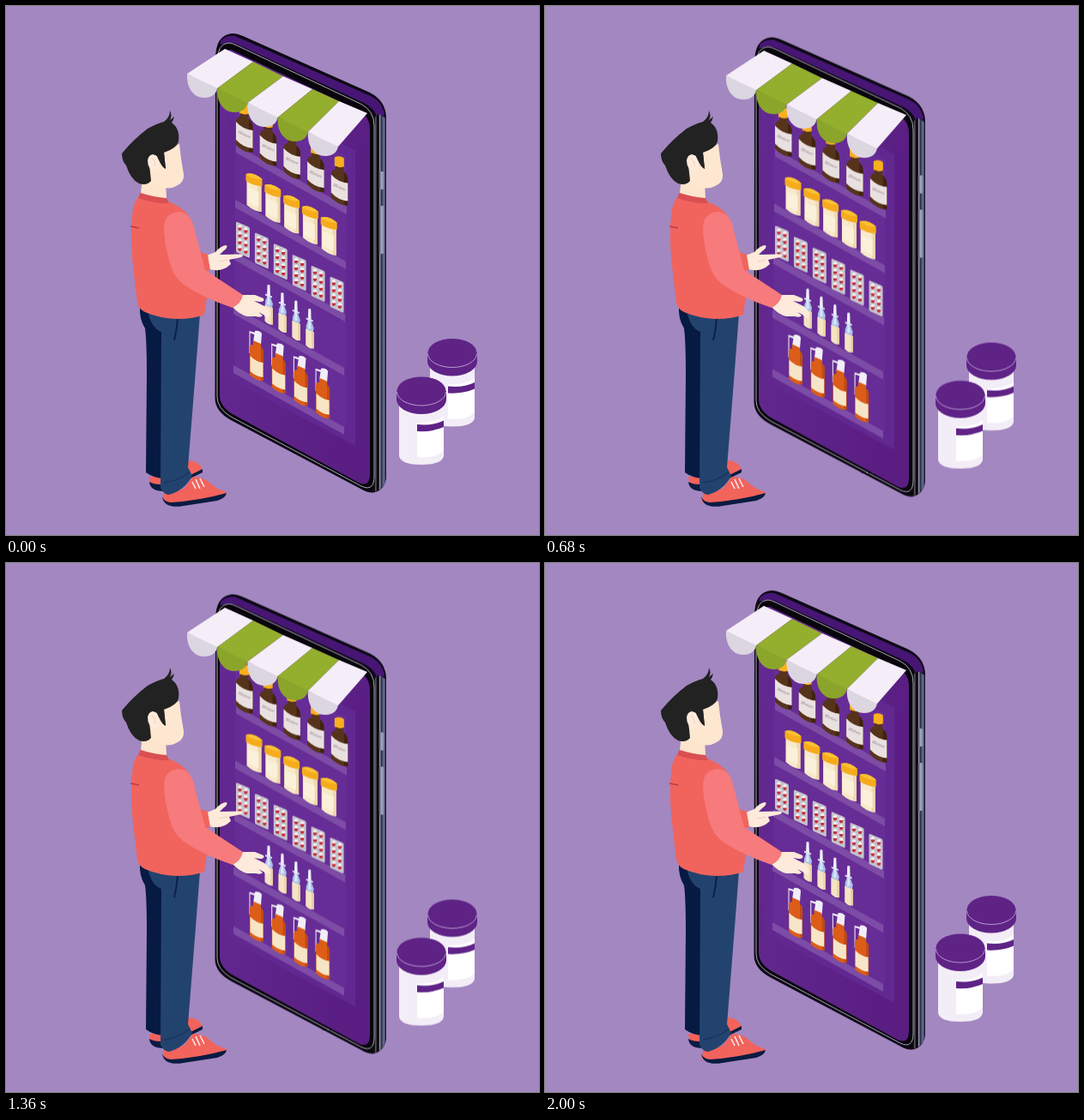
Animation, 621 px wide and 617 px high, one loop 2040 ms. Source, as an HTML page:

```html
<!DOCTYPE html>
<html lang="en">
<head>
<meta charset="utf-8">
<title>Pharmacy shelf</title>
<style>
  html, body { margin: 0; width: 100%; height: 100%; overflow: hidden; background: #a387c1; }
  svg { display: block; width: 621px; height: 617px; }
  .bob { animation: bob 2040ms cubic-bezier(.37, 0, .63, 1) infinite; }
  .phone { --drop: 6px; }
  .awning { --drop: 2.8px; }
  @keyframes bob {
    0%, 100% { transform: translateY(0); }
    50% { transform: translateY(var(--drop)); }
  }
</style>
</head>
<body>
<svg viewBox="0 0 621 617">
  <defs>
    <linearGradient id="side" gradientUnits="userSpaceOnUse" x1="426" x2="444" y1="0" y2="0">
      <stop offset="0" stop-color="#09070d"/>
      <stop offset=".2" stop-color="#141219"/>
      <stop offset=".27" stop-color="#6d6a73"/>
      <stop offset=".34" stop-color="#0b0a10"/>
      <stop offset=".46" stop-color="#08070b"/>
      <stop offset=".52" stop-color="#9c9cb3"/>
      <stop offset=".62" stop-color="#2c2e47"/>
      <stop offset=".8" stop-color="#6b7193"/>
      <stop offset=".9" stop-color="#20213b"/>
      <stop offset="1" stop-color="#171329"/>
    </linearGradient>
    <linearGradient id="screen" x1="0" x2="1" y1="0" y2=".3">
      <stop offset="0" stop-color="#642a92"/>
      <stop offset="1" stop-color="#5a1e83"/>
    </linearGradient>
    <linearGradient id="button" x1="0" x2="1">
      <stop offset="0" stop-color="#4a4d66"/>
      <stop offset=".5" stop-color="#a9adc2"/>
      <stop offset="1" stop-color="#6d7190"/>
    </linearGradient>

    <g id="syrup">
      <path d="M4 -46Q10 -49 15 -45V-35Q10 -33 4 -36Z" fill="#f9b01e"/>
      <path d="M5 -36Q10 -33 14.500 -35V-30Q19.500 -25 19.500 -20V10Q10 11 0 1V-26Q0 -31 5 -32Z" fill="#56331b"/>
      <path d="M15 -29Q19.500 -25 19.500 -20V10L15 9Z" fill="#40230f"/>
      <path d="M0 -26Q8 -17 19.500 -16V5Q8 4 0 -5Z" fill="#e9e0e0"/>
      <text transform="translate(2 -13) rotate(24)" font-family="Liberation Serif, serif" font-size="5" font-style="italic" fill="#8d7a86">Mixture</text>
    </g>

    <g id="tub">
      <path d="M1 8L18 15V45Q10 45 1 37Z" fill="#f8e9ca"/>
      <path d="M14 13L18 15V45L14 44Z" fill="#eed7ae"/>
      <path d="M2 17L15 22V40L2 34Z" fill="#fbf0da"/>
      <path d="M0 1Q9 -2 19 7V15Q9 15 0 9Z" fill="#f5ab1b"/>
      <path d="M0 1Q9 -2 19 7Q9 8 0 1Z" fill="#fbc234"/>
    </g>

    <g id="blister">
      <path d="M1.500 0L14.500 5.500Q16 6 16 8V40Q16 42 14.500 41.500L1.500 35.500Q0 35 0 33V1Q0 -.5 1.500 0Z" fill="#c4c2cc"/>
      <g id="pills"></g>
    </g>

    <g id="nasal">
      <path d="M-1.500 0Q0 -1 1.500 0L2 15H-2Z" fill="#eef0fb"/>
      <path d="M-4 10L4 13V15L-4 12Z" fill="#dfe3f5"/>
      <path d="M-2 14H2L5 22L4 27L-4 24L-4 19Z" fill="#a9c0ea"/>
      <path d="M-1 14H1L2 23H-2Z" fill="#d9e4f8"/>
      <path d="M-4.500 23L5 27V46Q0 47 -4.500 42Z" fill="#f5e3c4"/>
      <path d="M2.500 26L5 27V46L2.500 45Z" fill="#e9cfa6"/>
    </g>

    <g id="spray">
      <path d="M-8 3V27" stroke="#ded6ec" stroke-width="1.200" fill="none"/>
      <path d="M-8.500 1L5 5V8L-8.500 3Z" fill="#efeaf6"/>
      <path d="M-2 1Q3 0 6 4L5 17Q0 18 -4 14Z" fill="#f2eef8"/>
      <path d="M-4 12L5 16V20Q8 22 8 26V59Q0 60 -8 52V20Q-8 17 -4 17Z" fill="#dc5d18"/>
      <path d="M5 20Q8 22 8 26V59L5 58Z" fill="#c14b10"/>
      <path d="M-7.500 30Q-1 37 7.500 38V55Q-1 54 -7.500 48Z" fill="#f7e5c8"/>
    </g>

    <g id="jar">
      <path d="M458 462V525Q460 535 484 535Q508 535 510 525V462Z" fill="#f3edf7"/>
      <path d="M479 486Q500 487 510 478V518Q502 528 479 526Z" fill="#fff"/>
      <path d="M479 488Q497 490 510 483.500V491Q497 497 479 496Z" fill="#5f2386"/>
      <path d="M455 449V459A29 17 0 0 0 513 459V449Z" fill="#5f2386"/>
      <ellipse cx="484" cy="449" rx="28.500" ry="16.500" fill="#5f2386"/>
      <path d="M455.500 450A28.500 16 0 0 0 512.500 450" fill="none" stroke="#b79bd0" stroke-width="1"/>
    </g>
  </defs>

  <rect width="621" height="617" fill="#a387c1"/>

  <g class="bob phone">
    <use href="#jar" x="36" y="-44.500"/>
    <use href="#jar"/>

    <path d="M244 62Q244 34 263 32Q268 31.500 276 35L424 101Q443 111 443 131V548Q442 565 428 567.500Q421 568 414 563.500L262 483Q244 473 243.500 458Z" fill="#0d0915"/>
    <path d="M250 41Q256 33.500 267 35L425 105Q439 112 441 127L433 132Q430 119 417 113L270 45Q260 40 250 45Z" fill="#471675"/>
    <path d="M427 132L434 126L443 131V548Q442 565 428 567Q424 566 426 560Z" fill="url(#side)"/>
    <path d="M246 66Q246 43 260 43Q264 43.500 270 46.500L414 114.500Q429 122.500 429 140V548Q429 567 414 560L262 479Q246 469 246 456Z" fill="#08060c" stroke="#aaa5b3" stroke-width="1"/>
    <path d="M249 68Q249 50 262 51L411 122Q424 129 424 144V545Q424 562 411 556L264 476Q249 467 249 454Z" fill="url(#screen)"/>
    <path d="M257 98L407 168V513L257 433Z" fill="#622891"/>
    <path d="M267 110L396 175V492L267 422Z" fill="#672d96"/>
    <rect x="434.500" y="193" width="6.500" height="21" rx="2" fill="url(#button)"/>
    <rect x="434.500" y="233" width="6.500" height="56" rx="2" fill="url(#button)"/>
    <g id="shelves" fill="#7d4ca6"></g>
    <g id="goods"></g>
  </g>

  <g class="bob awning" id="awning"></g>

  <g>
    <!-- shoes -->
    <path d="M167 549L183 549L212 530Q224 530 229 540L205 553L184 562L168 557Z" fill="#f2635b"/>
    <path d="M167 555Q180 562 205 552L229 540V544L184 566Q168 566 167 555Z" fill="#0a1b41"/>
    <path d="M184 568L207 563L218 549Q230 549 237 556Q244 563 257 567Q257 573 246 575L205 580L183 579Z" fill="#f2635b"/>
    <path d="M182 572Q184 578 192 579Q225 577 257 568Q256 574 246 577L207 583Q184 587 182 572Z" fill="#0a1b41"/>
    <path d="M217 555L221 563M221 552L226 563M226 551L231 561" stroke="#fbe9ec" stroke-width="1.600" fill="none"/>

    <!-- trousers -->
    <path d="M156 350L184 360L183 551Q171 550 163 544L164 430Q164 390 162 376Q155 365 156 350Z" fill="#071a42"/>
    <path d="M165 354L226 359L221 425L212 538L217 548Q208 565 190 570Q184 570 180 562L181 380Q168 375 165 354Z" fill="#23436f"/>
    <path d="M200 365Q199 378 196 390" stroke="#0b2148" stroke-width="2" fill="none"/>
    <path d="M184 556Q204 553 214 543" stroke="#183660" stroke-width="1.500" fill="none"/>

    <!-- far hand -->
    <path d="M234 291L244 287Q251 279 257 279Q259 282 253 286L249 290L274 289.500Q278 291 274 293L260 296L262 301L257 305Q249 310 236 307Z" fill="#fdeadb"/>
    <path d="M258 296L248 298" stroke="#efcfb9" stroke-width="1" fill="none"/>

    <!-- near hand -->
    <path d="M264 351L275 337L290 337L300 341Q302 345 296 345L289 344L301 350Q308 355 308 361Q306 366 300 360L294 357L299 361Q297 364 291 362H281Q272 360 264 351Z" fill="#fdeadb"/>

    <!-- sweater -->
    <path d="M156 221Q148 228 147 245Q144 270 149 312L153 346Q154 353 162 357Q178 364 199 365Q219 365 231 360L234 340L230 310L238 308L235 290L224 286L213 245Q205 234 189 228Z" fill="#f0645d"/>
    <path d="M157 217L187 224L190 230Q174 231 154 224Z" fill="#d94f52"/>
    <path d="M145 257L155 259" stroke="#b73d48" stroke-width="1.300"/>
    <path d="M184 258Q185 242 200 240Q213 240 218 254L232 308L276 337Q274 347 264 352Q231 341 207 325Q195 316 191 300Q184 276 184 258Z" fill="#f77a7c"/>

    <!-- head -->
    <path d="M159 200L186 205L187 224Q172 223 157 218Z" fill="#fde4cc"/>
    <path d="M168 172L202 161L204 178L207 196Q208 205 200 209Q190 215 182 211L164 206Z" fill="#fee7d0"/>
    <path d="M135 172Q148 156 165 143Q176 137 184 135Q191 130 191 122Q194 128 191 133L196 129Q195 134 193 136Q203 143 201 158Q199 166 184 171L186 190Q181 188 178 177L171 173Q165 178 168 194L169 204Q164 210 155 207Q145 202 140 186Q135 181 135 172Z" fill="#222222"/>
    <path d="M176 175Q167 170 165 180Q165 190 173 193L179 189Z" fill="#fdeadb"/>
    <path d="M170 178Q174 180 174 187" stroke="#f2cfb5" stroke-width="1" fill="none"/>
    <path d="M174 170L184 171L186 190Q180 187 174 170Z" fill="#222222"/>
  </g>
</svg>
<script>
  const fill = (id, markup) => { document.getElementById(id).innerHTML = markup; };
  const repeat = (n, draw) => Array.from({ length: n }, (_, i) => draw(i)).join('');
  const row = (name, n, x, y, dx, dy) =>
    repeat(n, i => `<use href="#${name}" x="${x + dx * i}" y="${y + dy * i}"/>`);

  fill('pills', repeat(8, i => {
    const x = 4.4 + (i % 2) * 7, y = 6.5 + (i % 2) * 3 + (i >> 1) * 8;
    return `<ellipse cx="${x}" cy="${y}" rx="2.3" ry="3.4" fill="#f4eef2"/>
      <path d="M${x - 2.3} ${y}h4.6a2.3 3.4 0 0 1 -4.6 0" fill="#c2323c"/>`;
  }));

  const ledges = [[268, 162], [267, 226], [266, 287], [265, 350], [265, 419]];
  fill('shelves', ledges.map(([x, y]) => `<path d="M${x} ${y}l129 72v9l-129 -72z"/>`).join(''));

  fill('goods',
    row('syrup', 5, 268, 161, 27.7, 15.4) +
    row('tub', 5, 279.5, 195, 21.8, 12.7) +
    row('blister', 6, 268, 252, 21.9, 12.8) +
    row('nasal', 4, 306, 325.5, 15.9, 9.3) +
    row('spray', 4, 292, 378, 25.7, 14.6));

  const crest = [[255, 50], [288, 65], [323, 82], [357, 97], [388, 111], [421, 125]];
  fill('awning', repeat(5, i => {
    const x = 211 + 35.2 * i, y = 79 + 17 * i, green = i % 2;
    const [a, b] = [crest[i], crest[i + 1]];
    return `<path d="M${x} ${y}c-1 16 7 28 20 28c10 0 15.2 -6 15.2 -13z" fill="${green ? '#8ba52a' : '#dcd6e1'}"/>
      <path d="M${a}L${b}L${x + 35.2} ${y + 17}L${x} ${y}z" fill="${green ? '#94ae2e' : '#f5eef8'}"/>`;
  }));
</script>
</body>
</html>
```
